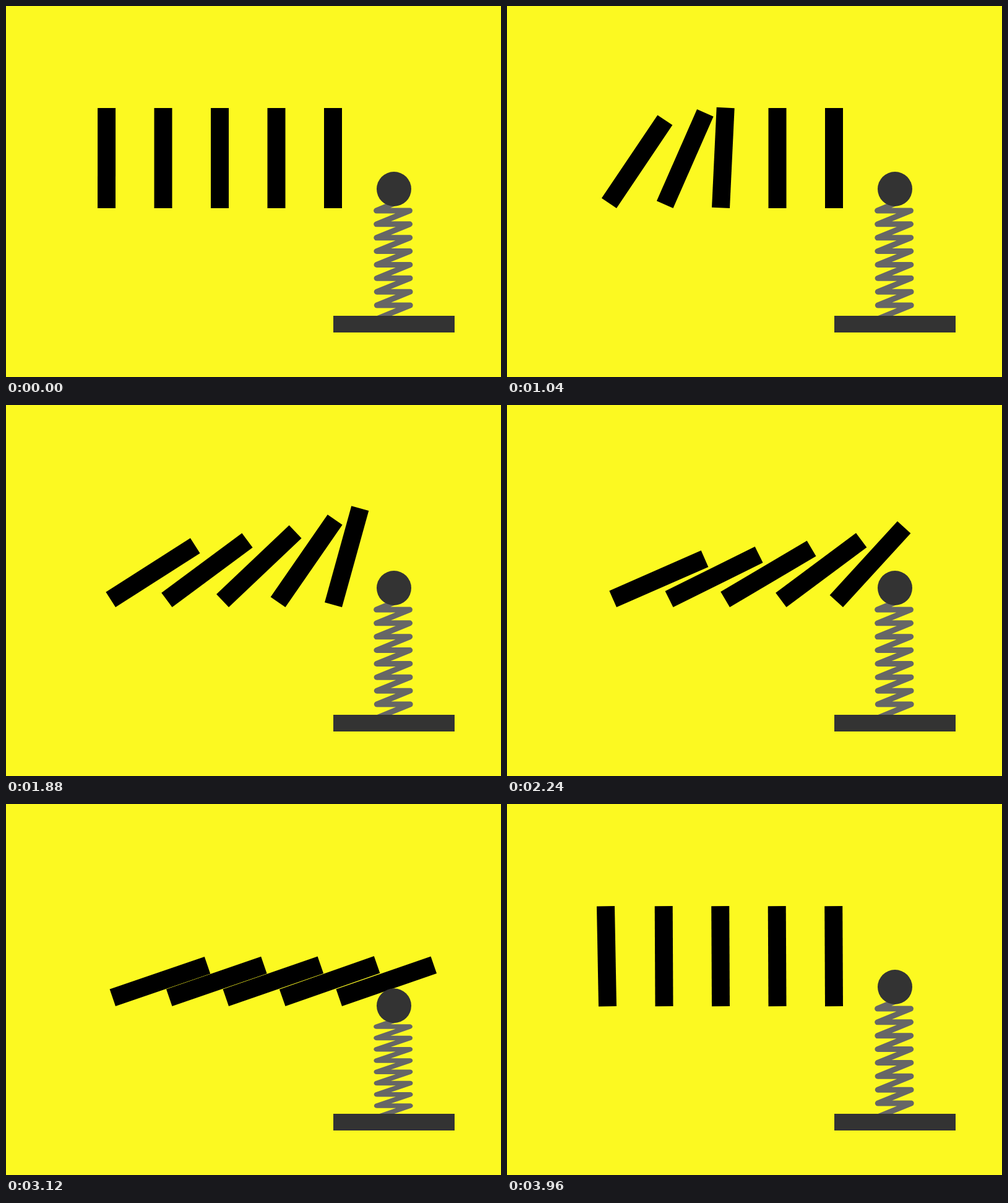
These frames come from a looping animation (800 px wide and 600 px high, 4 s). An HTML page with a canvas:

```html
<!DOCTYPE html>
<html lang="en">
<head>
<meta charset="utf-8">
<title>Dominoes and spring</title>
<style>
  html, body { margin: 0; width: 100%; height: 100%; overflow: hidden; background: #fcf921; }
  canvas { display: block; }
</style>
</head>
<body>
<canvas id="stage" width="800" height="600"></canvas>
<script>
const ctx = document.getElementById('stage').getContext('2d');
const LOOP = 4000;
const BAR = { width: 29, height: 162, firstPivot: 177, gap: 91.5, floor: 327 };
const BALL = { x: 627, restY: 296, radius: 28 };
const SPRING = { anchorY: 509, restHeight: 185, rows: 8, pitch: 21.86 };

// Each bar falls on its own schedule, then all swing back on shared times.
const SWING_TIMES = [2600, 2900, 3200, 3360, 3520, 3710, 3960, 4000];
const bars = [
  { fall: [[0, 0], [640, 21.8], [1400, 44.2], [1880, 57.4], [2240, 66.3]],
    swing: [70.8, 71.7, 70.6, 67, 18.5, -10, -1.1, 0] },
  { fall: [[655, 0], [1000, 21.8], [1400, 37.3], [1880, 53.4]],
    swing: [70.3, 71.9, 70.3, 66, 18.2, -2.5, -0.28, 0] },
  { fall: [[1000, 0], [1400, 26], [1880, 46.5]],
    swing: [68.8, 72.2, 70, 64, 17.3, -2.5, -0.28, 0] },
  { fall: [[1350, 0], [1400, 4.6], [1880, 34.6]],
    swing: [67.3, 73.1, 69, 58.5, 15.3, -2.5, -0.28, 0] },
  { fall: [[1690, 0], [1880, 15.4], [2240, 42.4]],
    swing: [63.1, 75, 68, 49.5, 11.6, -2.5, -0.28, 0] },
];

// Smooth curve through the points that never overshoots them.
function smoothCurve(points) {
  const slopes = points.slice(1).map(([t, v], i) => (v - points[i][1]) / (t - points[i][0]));
  const tangents = points.map((_, i) => {
    const before = slopes[i - 1] ?? slopes[i];
    const after = slopes[i] ?? before;
    return before * after > 0 ? 2 * before * after / (before + after) : 0;
  });
  return time => {
    if (time <= points[0][0]) return points[0][1];
    const i = Math.max(1, points.findIndex(([t]) => t >= time)) - 1;
    const [t0, v0] = points[i], [t1, v1] = points[i + 1];
    const span = t1 - t0, u = (time - t0) / span, w = 1 - u;
    return w * w * (1 + 2 * u) * v0 + u * u * (3 - 2 * u) * v1
      + span * u * w * (w * tangents[i] - u * tangents[i + 1]);
  };
}

const angleCurves = bars.map(({ fall, swing }) =>
  smoothCurve([...fall, ...SWING_TIMES.map((t, i) => [t, swing[i]])]));

function drawBar(index, angle) {
  ctx.save();
  ctx.translate(BAR.firstPivot + index * BAR.gap, BAR.floor);
  ctx.rotate(angle);
  ctx.fillStyle = '#000';
  ctx.fillRect(-BAR.width, -BAR.height, BAR.width, BAR.height);
  ctx.restore();
}

// The ball touches the underside of the last bar once the bar leans far enough.
function ballHeight(angle) {
  if (angle < 0.8) return BALL.restY;
  const reach = BALL.x - BAR.firstPivot - 4 * BAR.gap;
  const contact = 326.5 + (27.3 - reach * Math.cos(angle)) / Math.sin(angle);
  return Math.max(BALL.restY, contact);
}

function drawSpring(ballY) {
  ctx.save();
  ctx.translate(0, SPRING.anchorY);
  ctx.scale(1, (SPRING.anchorY - ballY - BALL.radius) / SPRING.restHeight);
  ctx.beginPath();
  ctx.moveTo(625, -189);
  for (let row = 0; row < SPRING.rows; row++) {
    const y = -178 + row * SPRING.pitch, drift = row * 0.1;
    ctx.lineTo(598.6 + drift, y);
    ctx.lineTo(652.5 + drift, y);
  }
  ctx.lineTo(599.5, -178 + SPRING.rows * SPRING.pitch);
  ctx.lineWidth = 9;
  ctx.lineCap = ctx.lineJoin = 'round';
  ctx.strokeStyle = '#666';
  ctx.stroke();
  ctx.restore();
}

function draw(time) {
  ctx.fillStyle = '#fcf921';
  ctx.fillRect(0, 0, 800, 600);

  const angles = angleCurves.map(curve => curve(time) * Math.PI / 180);
  const ballY = ballHeight(angles[4]);
  drawSpring(ballY);
  angles.forEach((angle, i) => drawBar(i, angle));

  ctx.fillStyle = '#333';
  ctx.fillRect(529, 501, 196, 27);
  ctx.beginPath();
  ctx.arc(BALL.x, ballY, BALL.radius, 0, 2 * Math.PI);
  ctx.fill();
}

const start = performance.now();
function tick() {
  draw((performance.now() - start) % LOOP);
  requestAnimationFrame(tick);
}
tick();
</script>
</body>
</html>
```
